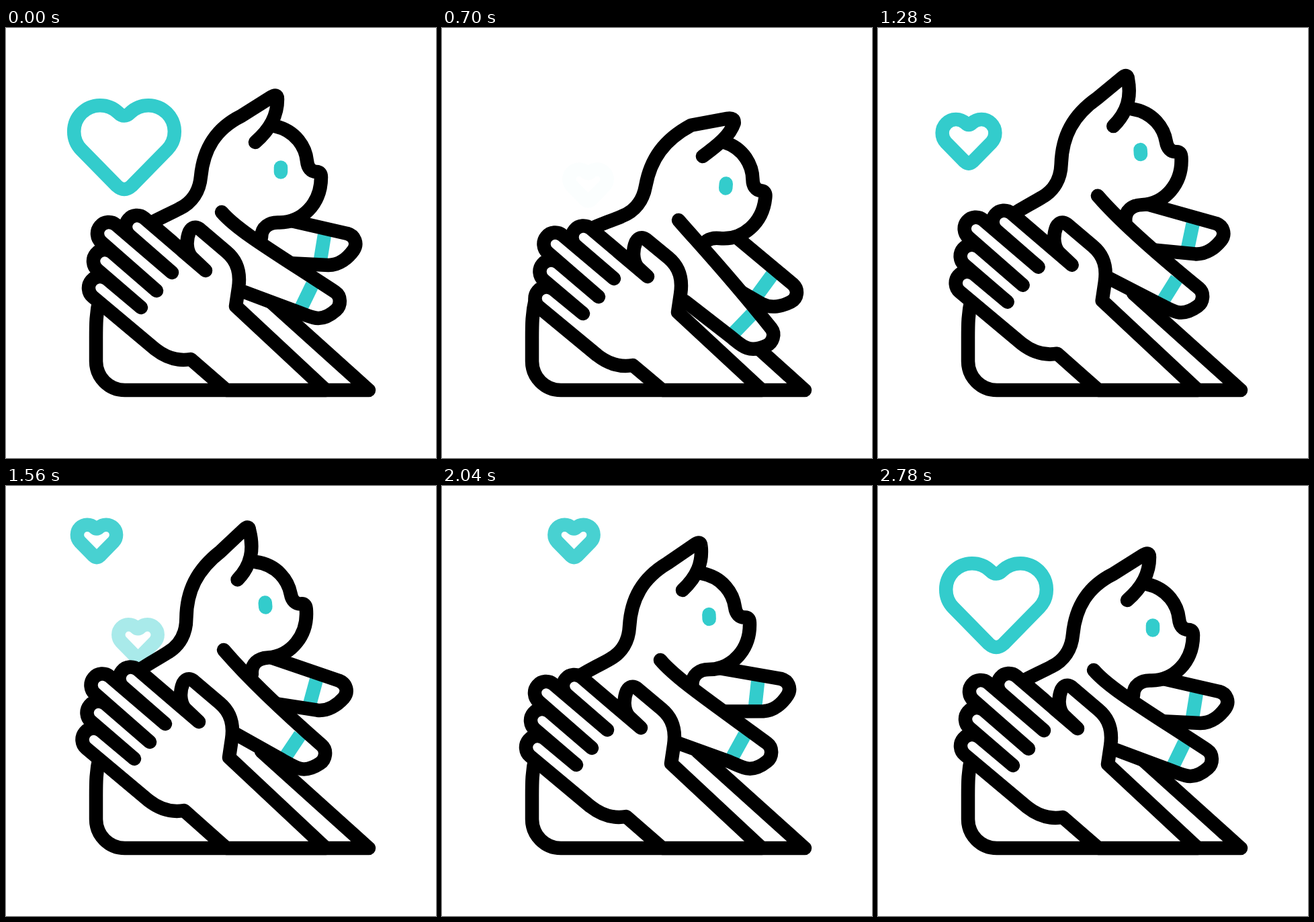
These frames come from a looping animation (640 by 640 pixels, 3400 ms). An HTML page:

```html
<!DOCTYPE html>
<html lang="en">
<head>
<meta charset="utf-8">
<title>Petting a cat</title>
<style>
  html, body { margin: 0; width: 100%; height: 100%; overflow: hidden; background: #fff; }
  svg { display: block; width: 100%; height: 100%; }
  path { fill: none; stroke: #000; stroke-width: 20.5; stroke-linecap: round; stroke-linejoin: round; }
  .skin { fill: #fff; stroke: none; }
  .solid { fill: #fff; }
  .teal { stroke: #3cc; }
  .band { stroke: #3cc; stroke-linecap: butt; }
</style>
</head>
<body>
<svg viewBox="0 0 640 640">
  <g id="hearts"></g>
  <path d="M139,404 C134,424 134,442 134,462 V496 A43,43 0 0 0 177,539 H540 L380,395"/>
  <g id="farLeg">
    <path class="skin" d="M-115,-46 L3,-19 C14,-16 19,-4 12,6 C4,17 -9,28 -25,28 L-105,24"/>
    <path class="band" d="M-31,-17 L-37,20"/>
    <path d="M-115,-46 L3,-19 C14,-16 19,-4 12,6 C4,17 -9,28 -25,28 L-105,24"/>
  </g>
  <g id="body">
    <path id="bodySkin" class="skin"/>
    <path id="back"/>
    <path id="face"/>
    <path class="teal" d="M409,207.5 V214.5"/>
  </g>
  <path id="legSkin" class="skin"/>
  <path id="legBand" class="band"/>
  <path id="leg"/>
  <path id="hand" class="solid"/>
</svg>
<script>
const LOOP = 3400;
const TIMES = [200, 650, 700, 1040, 1470, 1560, 2040, 2460, 2780];
const $ = id => document.getElementById(id);
const draw = (id, d) => $(id).setAttribute('d', d);
const clamp = v => Math.max(0, Math.min(1, v));

// Poses: rest, crouched, rising, stretched, sinking, dip
const track = (rest, low, mid, high, back, dip) =>
  [rest, low, low, mid, high, high, back, dip, rest];

// dx, dy, angle, ear dx, ear dy
const body = track([0, 0, 0, 0, 0], [13.5, 24, 4.7, 9.5, 11], [-6, -7, -.3, -1, 2.5],
  [-23, -34, -5, -9, -7], [-11.5, -16.5, -2.2, -3, 0], [3, 5, .7, 4, 4]);
// fingertips, palm
const hand = track([0, 0], [15.5, 9], [-1, -3.5], [-9.5, -10], [2, -1], [.7, 0]);
// shoulder x, y, paw x, y, angle, belly x, y
const nearLeg = track([321, 274, 490, 393, 0, 355, 393], [352, 286, 490, 447, 18, 362, 407],
  [335, 264, 489, 392, 3, 350, 383], [324, 244, 470, 386, 8, 340, 368],
  [325, 259, 484, 383, 3, 350, 382], [327, 277, 486, 412, 7, 352, 398]);
// paw x, y, angle
const farLeg = track([505, 325, 0], [511, 397, 27], [510.5, 314, -2],
  [491, 308.5, 6], [502, 306, -3], [502.5, 359.5, 16]);

// Monotone cubic interpolation
function pose(rows, t) {
  const last = TIMES.length - 1;
  if (t <= TIMES[0] || t >= TIMES[last]) return rows[0];
  let i = 0;
  while (t >= TIMES[i + 1]) i++;
  const span = TIMES[i + 1] - TIMES[i], u = (t - TIMES[i]) / span;
  return rows[0].map((_, c) => {
    const rate = k => (rows[k + 1][c] - rows[k][c]) / (TIMES[k + 1] - TIMES[k]);
    const slope = k => {
      if (k === 0 || k === last) return 0;
      const a = rate(k - 1), b = rate(k);
      return a * b <= 0 ? 0 : 2 * a * b / (a + b);
    };
    const p = rows[i][c], q = rows[i + 1][c];
    const ease = u * u * (3 - 2 * u);
    return p + (q - p) * ease
      + span * u * (1 - u) * ((1 - u) * slope(i) - u * slope(i + 1));
  });
}

// Paws swing outwards on the way up
const swing = t => Math.sin(Math.PI * clamp((t - 700) / 340)) ** 2;

function drawBody(t) {
  const [dx, dy, angle, ex, ey] = pose(body, t);
  $('body').setAttribute('transform',
    `translate(${409 + dx},${211 + dy}) rotate(${angle}) translate(-409,-211)`);
  const kx = 350, ky = 131 - .6 * Math.abs(ex);
  const vx = 404 + ex, vy = 97 + ey;
  const outline = `M190,306 C215,288 235,281 258,269 C277,260 288,243 290,221
    C294,180 312,150 ${kx},${ky} L${vx + (kx - vx) * .17},${vy + (ky - vy) * .17}
    Q${vx},${vy} ${vx},${vy + 9}`;
  const front = `400,146 C432,153 446,178 448,198 C449,208 454,214 462,214
    Q469,214 469,222 C469,262 440,290 406,289.5 C392,289 380,296 380,312`;
  draw('back', `${outline} C${404 + ex / 2},${130 + ey / 2} 394,150 371,170`);
  draw('face', `M${front}`);
  draw('bodySkin', `${outline} L${front} L330,420 L200,400 Z`);
}

function drawNearLeg(t) {
  const [ax, ay, px, py, angle, gx, gy] = pose(nearLeg, t);
  const r = angle * Math.PI / 180, cos = Math.cos(r), sin = Math.sin(r);
  const x0 = px + 4 * swing(t);
  const p = (x, y) => `${x0 + x * cos - y * sin},${py + x * sin + y * cos}`;
  const d = `M${ax},${ay} C${ax + 24},${ay + 28} ${p(-90, -59)} ${p(0, 0)}
    C${p(9, 6)} ${p(9, 20)} ${p(1, 27)} C${p(-8, 35)} ${p(-17, 39)} ${p(-25, 39)}
    C${p(-34, 39)} ${p(-44, 34)} ${p(-55, 30)} L${gx},${gy}`;
  draw('leg', d);
  draw('legSkin', d);
  draw('legBand', `M${p(-34, -11)} L${p(-51, 24)}`);
}

function drawFarLeg(t) {
  const [x, y, angle] = pose(farLeg, t);
  $('farLeg').setAttribute('transform',
    `translate(${x + 9 * swing(t)},${y}) rotate(${angle})`);
}

function drawHand(t) {
  const [tip, palm] = pose(hand, t);
  const f = (x, y) => `${x + tip},${y + tip}`;
  const g = (x, y) => `${x + palm},${y + palm}`;
  const finger = (x, y, end) =>
    `L${f(x - 11, y + 13)} A17,17 0 0 1 ${f(x + 11, y - 13)} L${end} `;
  draw('hand', `M${g(222, 478)} `
    + finger(140, 387, g(201, 416)) + finger(147, 347, g(224, 391))
    + finger(153, 306, g(247, 364)) + finger(195, 296, g(297, 361))
    + `L${f(276, 341)} C${f(268, 331)} ${f(268, 315)} ${f(273, 303)}
      Q${f(279, 293)} ${f(288, 299)} L${g(328, 333)}
      C${g(346, 348)} ${g(349, 367)} ${g(346, 387)} L${g(342, 414)}
      L476,539 H328 L${g(275, 493)} C${g(258, 496)} ${g(240, 492)} ${g(222, 478)} Z`);
}

const HEART = 'M-11,58 L-64,4 A38.9,38.9 0 0 1 -9,-51 Q0,-42 9,-51 A38.9,38.9 0 0 1 64,4 L11,58 Q0,68 -11,58 Z';
const hearts = Array.from({ length: 4 }, () => {
  const el = document.createElementNS('http://www.w3.org/2000/svg', 'path');
  el.setAttribute('d', HEART);
  el.setAttribute('class', 'teal');
  return $('hearts').appendChild(el);
});

function drawHeart(el, x, y, scale, alpha) {
  el.setAttribute('transform', `translate(${x},${y}) scale(${scale})`);
  el.style.strokeWidth = 20.5 / scale;
  el.style.opacity = clamp(alpha);
}

function drawHearts(t) {
  // Main heart shrinks away upwards, then grows back from below
  if (t < 1000) {
    const u = clamp((t - 200) / 270);
    drawHeart(hearts[0], 176, 177 - 84 * u, 1 - .615 * u, (1 - u) * 6);
  } else {
    const u = clamp((t - 2282) / 270);
    drawHeart(hearts[0], 176, 245 - 68 * u, .385 + .615 * u, u * 5.4);
  }
  // Small hearts: x, y offset, start
  [[217.5, -3, 700], [135, 0, 1060], [196.5, 0, 1540]].forEach(([x, dy, start], i) => {
    const age = Math.max(0, Math.min(540, t - start));
    drawHeart(hearts[i + 1], x, 237 + dy - .31 * age,
      .553 - .00068 * Math.abs(age - 260), Math.min(age / 50, (535 - age) / 38));
  });
}

function tick() {
  const t = performance.now() % LOOP;
  drawHearts(t);
  drawFarLeg(t);
  drawBody(t);
  drawNearLeg(t);
  drawHand(t);
  requestAnimationFrame(tick);
}
tick();
</script>
</body>
</html>
```
